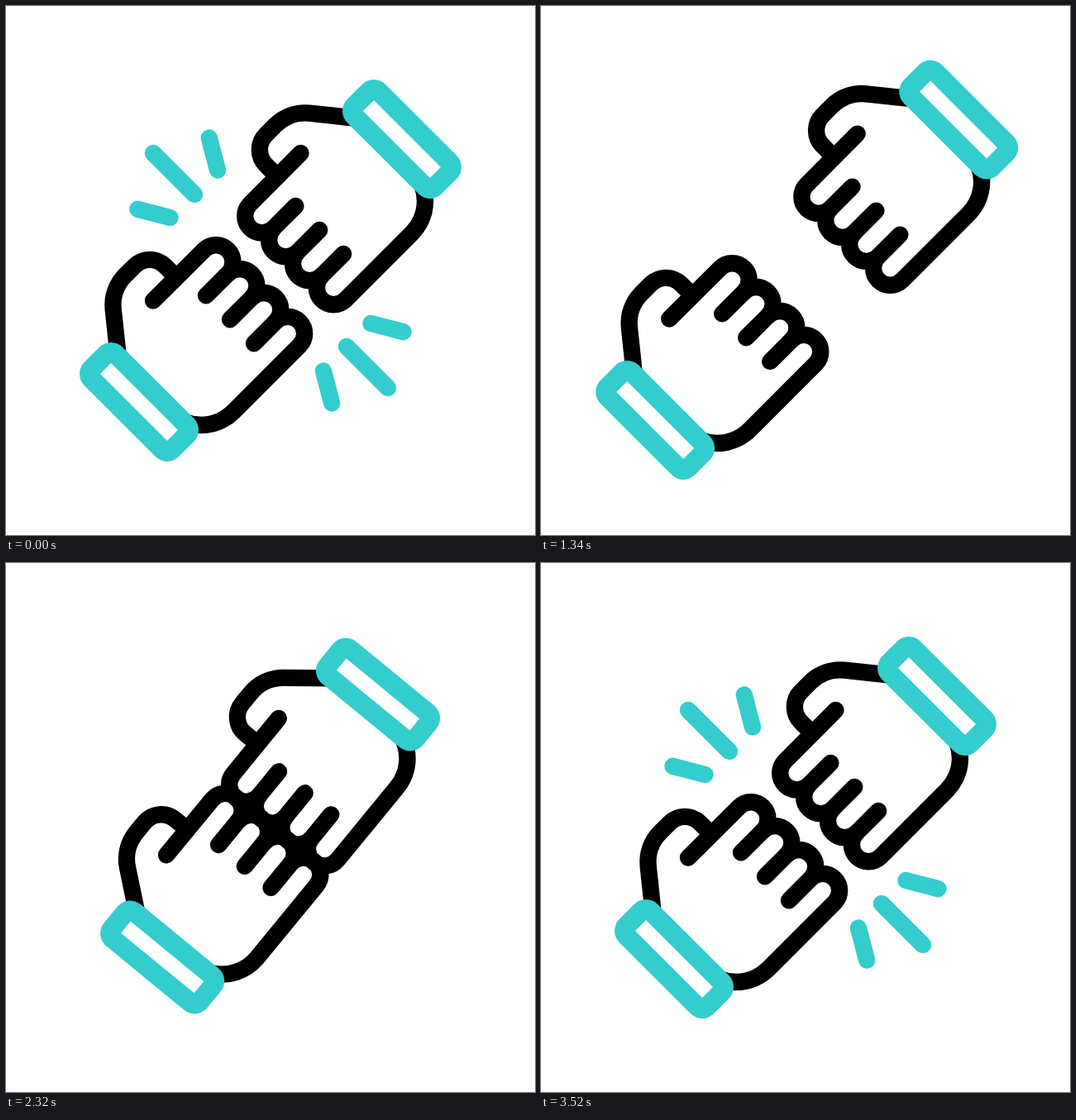
Recreate the animation shown at these times as an HTML page. Size 640 px wide and 640 px high, loop 3.6 s.

```html
<!DOCTYPE html>
<html lang="en">
<head>
<meta charset="utf-8">
<title>Fist bump</title>
<style>
  html, body { margin: 0; width: 100%; height: 100%; overflow: hidden; background: #fff; }
  svg { display: block; width: 100vw; height: 100vh; }
  path, line { fill: none; stroke-width: 20.4; stroke-linecap: round; stroke-linejoin: round; }
  path { stroke: #000; }
  line { stroke: #33cdcd; }
  .cuff { fill: #33cdcd; }
  .gap { fill: #fff; }
</style>
</head>
<body>
<svg viewBox="0 0 640 640">
  <defs>
    <g id="hand">
      <!-- thumb and wrist -->
      <path d="M136 426L129.7 367A51 51 0 0 1 144.3 325.8L155.5 314.6A26 26 0 0 1 192.5 314.6L206 328"/>
      <!-- knuckles and palm -->
      <path d="M178 356.5L239.6 295.2a20.4 20.4 0 0 1 28.9 28.9a20.4 20.4 0 0 1 28.9 28.9a20.4 20.4 0 0 1 28.9 28.9a20.4 20.4 0 0 1 28.9 28.9L275 491A55 55 0 0 1 217 503.5"/>
      <path d="M242 350.4l26.4-26.4M271 379.3l26.4-26.4M300 408.2l26.4-26.4"/>
      <g transform="translate(161 479) rotate(45)">
        <rect class="cuff" x="-80.8" y="-32.7" width="161.6" height="65.4" rx="20"/>
        <rect class="gap" x="-57.3" y="-9.2" width="114.6" height="18.4"/>
      </g>
    </g>
  </defs>
  <g id="rays"></g>
  <g id="pair">
    <use id="left" href="#hand"/>
    <use id="right" href="#hand"/>
  </g>
</svg>
<script>
const LOOP = 3600;
const $ = id => document.getElementById(id);

// Offsets of both hands: left x, y, right x, y
const BASE = [0, 0, 0, 0];
const NEAR = [13.4, -15.7, -13.8, 11.6];
const FAR = [-31.7, 31.2, 36, -32];
const MOVE = [[0, BASE], [208, NEAR], [1792, FAR], [1958, NEAR], [3208, NEAR], [3440, BASE]];

const UP = [-11], DOWN = [21.1];
const TURN = [[1792, [0]], [1958, UP], [2167, DOWN], [2375, UP], [2583, DOWN],
  [2792, UP], [3000, DOWN], [3208, UP], [3440, [0]]];

// Visible part of each ray, 0 at the inner end and 1 at the outer end
const TRIM = [[0, [0, 1]], [208, [1, 1]], [1890, [1, 1]], [1890, [0, 0]], [2000, [0, 1]],
  [2208, [1, 1]], [3320, [1, 1]], [3320, [0, 0]], [3520, [0, 1]]];

// Inner and outer ends, relative to the centre
const RAYS = [[-92, -92, -142, -142], [-121.5, -64, -160.5, -74.2], [-64, -121.5, -74.2, -160.5]];
const rays = [1, -1].flatMap(sign => RAYS.map(ends => {
  const el = document.createElementNS("http://www.w3.org/2000/svg", "line");
  $("rays").append(el);
  return { el, ends: ends.map(v => 320 + sign * v) };
}));

const mix = (a, b, k) => a + (b - a) * k;

function sample(keys, t) {
  const next = keys.findIndex(key => key[0] > t);
  if (next === 0) return keys[0][1];
  if (next < 0) return keys[keys.length - 1][1];
  const [t0, from] = keys[next - 1], [t1, to] = keys[next];
  const x = (t - t0) / (t1 - t0);
  return from.map((v, i) => mix(v, to[i], x * x * (3 - 2 * x)));
}

function draw(t) {
  const [lx, ly, rx, ry] = sample(MOVE, t);
  $("left").setAttribute("transform", `translate(${lx} ${ly})`);
  $("right").setAttribute("transform", `matrix(0 1 1 0 ${rx} ${ry})`);
  $("pair").setAttribute("transform", `rotate(${sample(TURN, t)[0]} 320 320)`);

  const [start, end] = sample(TRIM, t);
  $("rays").setAttribute("visibility", end - start > 0.001 ? "visible" : "hidden");
  for (const { el, ends: [x0, y0, x1, y1] } of rays) {
    el.setAttribute("x1", mix(x0, x1, start));
    el.setAttribute("y1", mix(y0, y1, start));
    el.setAttribute("x2", mix(x0, x1, end));
    el.setAttribute("y2", mix(y0, y1, end));
  }
}

function tick() {
  draw(performance.now() % LOOP);
  requestAnimationFrame(tick);
}
tick();
</script>
</body>
</html>
```
